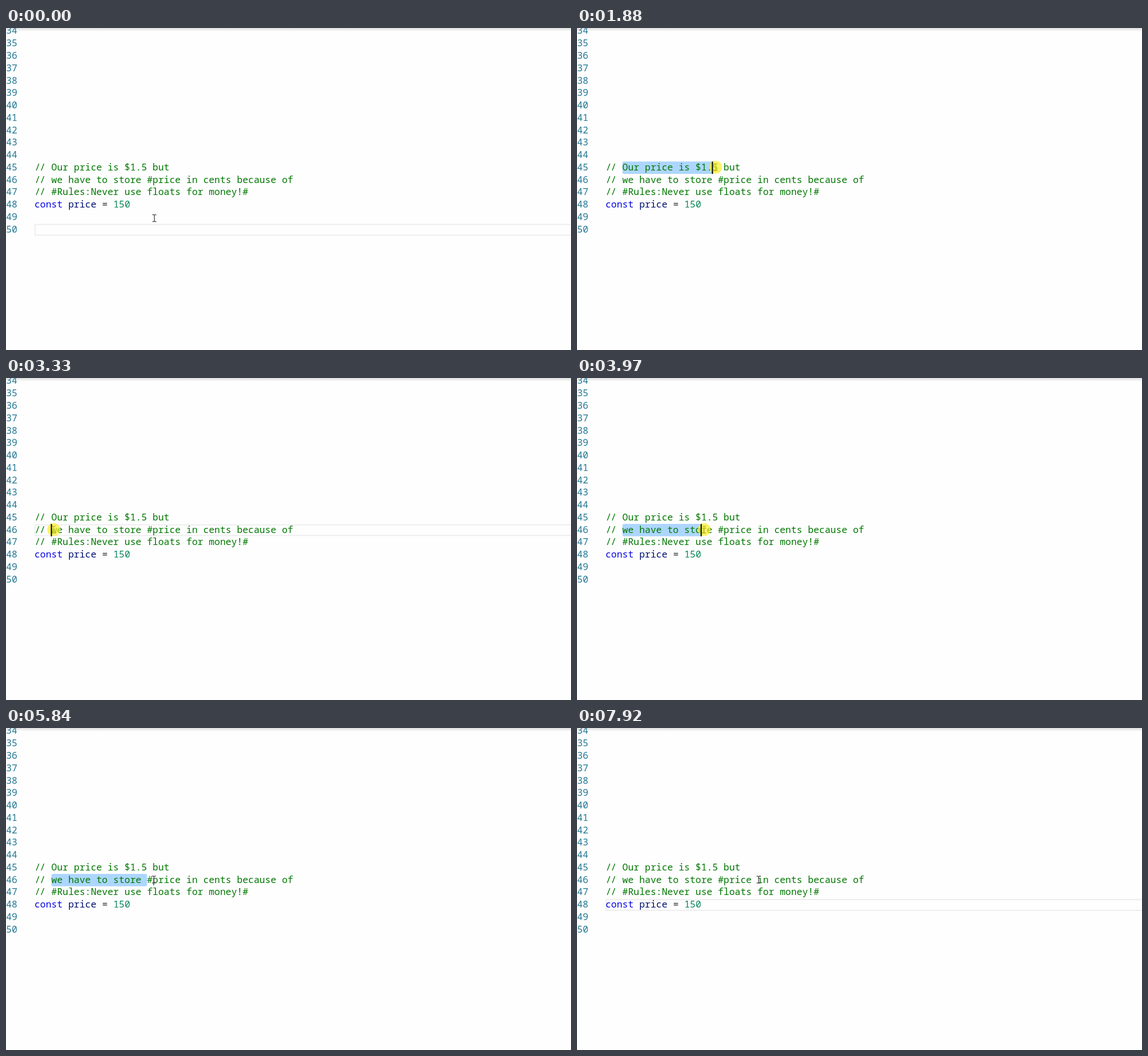
Animation, 991 px wide and 565 px high, one loop 7.99 s. Source, as an HTML page:

```html
<!DOCTYPE html>
<html lang="en">
<head>
<meta charset="utf-8">
<title>Code editor</title>
<style>
  html, body { margin: 0; width: 100%; height: 100%; overflow: hidden; background: #fefefe; }
  svg { display: block; width: 991px; height: 565px; }
  text { font: 16.45px "Noto Sans Mono", "DejaVu Sans Mono", monospace; white-space: pre; }
  .gutter { fill: #237893; }
  .comment, .slashes { fill: #007800; }
  .slashes { letter-spacing: -1px; }
  .keyword { fill: #0505e6; }
  .name { fill: #001070; }
  .sign { fill: #222; }
  .number { fill: #098658; }
</style>
</head>
<body>
<svg viewBox="0 0 991 565">
  <defs>
    <linearGradient id="shade" x2="0" y2="1">
      <stop offset="0" stop-color="#dcdcdc"/>
      <stop offset="1" stop-color="#fefefe"/>
    </linearGradient>
  </defs>
  <rect width="991" height="565" fill="#fefefe"/>
  <rect width="991" height="6" fill="url(#shade)"/>
  <rect id="border" x="51" width="960" height="18.8" fill="none" stroke="#eee" stroke-width="2"/>
  <rect id="selection" height="21.8" rx="3" fill="#add6ff"/>
  <rect id="match" height="21.8" fill="#f8c8aa"/>
  <g id="code"></g>
  <path id="pointer" d="M-3.5-6H-1.2Q0-6 0-5Q0-6 1.2-6H3.5M0-5V5M-3.5 6H-1.2Q0 6 0 5Q0 6 1.2 6H3.5"
        fill="none" stroke="#444" stroke-width="1.3"/>
  <circle id="press" r="11.3" fill="#fbee1e" fill-opacity=".68"/>
  <rect id="caret" width="2" height="21.8" fill="#000"/>
</svg>
<script>
const LOOP = 7990, CHAR = 9.87, LEFT = 50, ROW = 21.77, BLINK = 500;
const $ = id => document.getElementById(id);
const rowTop = row => 234.3 + (row - 45) * ROW;
const colX = col => LEFT + col * CHAR;

const comment = words => [['slashes', '//'], ['comment', ' ' + words]];
const source = {
  45: comment('Our price is $1.5 but'),
  46: comment('we have to store #price in cents because of'),
  47: comment('#Rules:Never use floats for money!#'),
  48: [['keyword', 'const'], ['name', ' price'], ['sign', ' = '], ['number', '150']]
};

function addText(left, row, parts) {
  const text = document.createElementNS('http://www.w3.org/2000/svg', 'text');
  text.setAttribute('y', Math.round(rowTop(row) + 15.6));
  let col = 0;
  for (const [kind, words] of parts) {
    const span = document.createElementNS(text.namespaceURI, 'tspan');
    span.setAttribute('class', kind);
    span.setAttribute('x', left + col * CHAR + (kind === 'slashes' ? 0.5 : 0));
    span.textContent = words;
    text.append(span);
    col += words.length;
  }
  $('code').append(text);
}
for (let row = 34; row <= 50; row++) {
  addText(0.2, row, [['gutter', String(row)]]);
  if (source[row]) addText(LEFT, row, source[row]);
}

// Pointer moves, each ending on a column and row of the text grid.
const glide = (start, end, col, row) => ({ start, end, col, row });
const selectPrice = glide(1330, 2330, 24.7, 45);
const selectStore = glide(3390, 4260, 19.7, 46);
const moves = [
  glide(65, 220, 4.5, 46),
  glide(450, 990, 3.14, 45),
  selectPrice,
  glide(2560, 3100, 3.4, 46),
  selectStore,
  glide(4660, 4960, 22.5, 45.8),
  glide(5270, 5930, 21.2, 46),
  glide(6590, 7050, 36.6, 46),
  glide(7050, 7450, 27.2, 46)
];
const easeOut = k => Math.sin(Math.min(1, Math.max(0, k)) * Math.PI / 2);

function pointerAt(t) {
  let col = 21.3, row = 49.1;
  for (const move of moves) {
    const k = easeOut((t - move.start) / (move.end - move.start));
    col += (move.col - col) * k;
    row += (move.row - row) * k;
  }
  return { col, x: colX(col), y: rowTop(row) + 10 };
}

const within = (t, a, b) => t >= a && t < b;
const drags = [
  { press: 1240, release: 2560, until: 3330, move: selectPrice },
  { press: 3330, release: 4660, until: 5930, move: selectStore }
];
const CLICK = 5930, RELEASE = 6130, JUMP = 6200;

function editorAt(t) {
  if (t < drags[0].press) return { row: 50, from: 0, to: 0, caret: false };
  const drag = drags.find(d => within(t, d.press, d.until));
  if (drag) {
    // The caret trails the pointer slightly.
    const { end, row, col } = drag.move;
    const reach = pointerAt(Math.max(drag.press, Math.min(t - 25, end))).col;
    const to = Math.min(Math.round(reach), row === 45 ? 24 : Math.round(col));
    return { row, from: 3, to, since: end, caret: true };
  }
  return t < JUMP
    ? { row: 46, from: 21, to: 21, since: CLICK, caret: true }
    : { row: 48, from: 6, to: 6, since: JUMP + 50, caret: true };
}

function set(id, attrs) {
  for (const key in attrs) $(id).setAttribute(key, attrs[key]);
}
const show = (id, on) => set(id, { visibility: on ? 'visible' : 'hidden' });

function render(t) {
  const { row, from, to, since, caret } = editorAt(t);
  const top = rowTop(row), mouse = pointerAt(t);

  set('border', { y: top + 1.5 });
  show('border', from === to);
  set('selection', { x: colX(from), y: top, width: (to - from) * CHAR });
  show('selection', to > from);
  set('match', { x: colX(6), y: rowTop(48), width: 11 * CHAR });
  show('match', within(t, JUMP, 6590));

  set('caret', { x: colX(to) - 1, y: top });
  show('caret', caret && (t < since || Math.floor((t - since) / BLINK) % 2 === 0));

  set('pointer', { transform: `translate(${mouse.x} ${mouse.y})` });
  set('press', { cx: mouse.x, cy: mouse.y });
  show('press', drags.some(d => within(t, d.press, d.release)) || within(t, CLICK, RELEASE));
}

const begin = performance.now();
function tick() {
  render((performance.now() - begin) % LOOP);
  requestAnimationFrame(tick);
}
tick();
</script>
</body>
</html>
```
